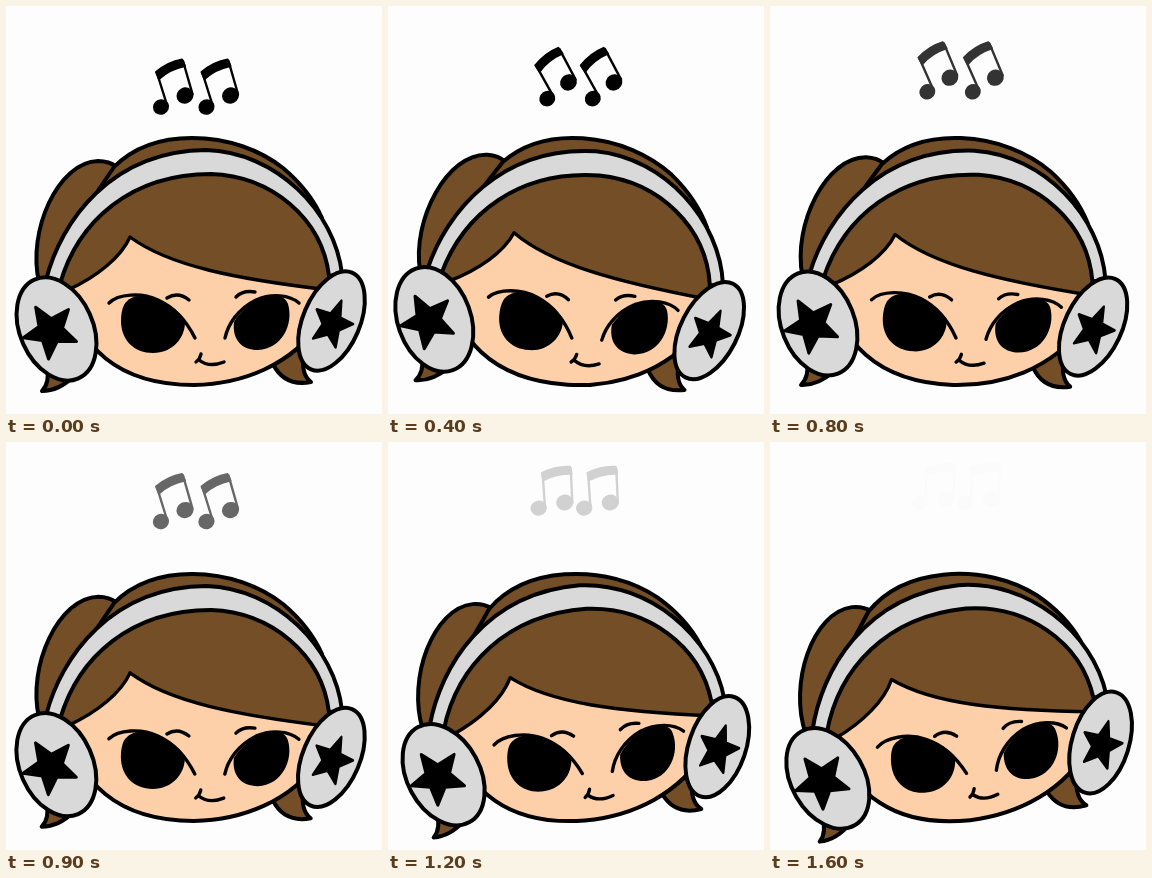
Write an HTML page that moves like this. It is 376 by 408 pixels and loops after 1.7 s.

```html
<!DOCTYPE html>
<html lang="en">
<head>
<meta charset="utf-8">
<title>Headphones girl</title>
<style>
html, body { margin: 0; width: 100%; height: 100%; overflow: hidden; background: #fdfdfd; }
svg { display: block; width: 376px; height: 408px; }
.line { fill: none; stroke: #000; stroke-width: 4; stroke-linecap: round; stroke-linejoin: round; }
.thin { stroke-width: 3.4; }
.hair { fill: #734e26; }
.skin { fill: #fdd0aa; }
.grey { fill: #d9d9d9; }
.star { stroke: #000; stroke-width: 3; stroke-linejoin: round; }
.head { transform-origin: 186px 258px; }
.note { transform-origin: 167px 81px; }
</style>
</head>
<body>
<svg viewBox="0 0 376 408">
  <defs>
    <g id="pair">
      <ellipse cx="155" cy="101" rx="8.2" ry="7.6" transform="rotate(-25 155 101)"/>
      <ellipse cx="179" cy="89.5" rx="8.6" ry="8" transform="rotate(-25 179 89.5)"/>
      <path d="M150 66 Q162 56 176 53.5 L179 60 Q164 63 153 73Z" stroke="#000" stroke-width="2" stroke-linejoin="round"/>
      <path d="M151 67 L161 99 M177 55 L186.5 88" class="line" style="stroke-width:2.4"/>
    </g>
    <path id="star" class="star" d="M0 -28 L7.3 -10 L26.6 -8.7 L11.8 3.8 L16.5 22.7 L0 12.4 L-16.5 22.7 L-11.8 3.8 L-26.6 -8.7 L-7.3 -10Z"/>
  </defs>

  <g class="note"><use href="#pair"/></g>
  <g transform="translate(45.5)"><g class="note"><use href="#pair"/></g></g>

  <g class="head">
    <!-- back hair and tails -->
    <path class="line hair" d="M33 276 C21 225 52 156 92 155 C101 155 107 158 111 161 L120 220 L58 290Z"/>
    <path class="line hair" d="M108 161 C130 139 158 132 186 132 C222 132 254 144 277 162 C296 178 308 194 316 212 L200 220 L75 210Z"/>
    <path class="line hair" d="M41 360 Q44 377 36 385 Q53 385 68 370Z"/>
    <path class="line hair" d="M267 358 C275 374 289 379 305 376 Q294 368 298 345 L285 335Z"/>

    <!-- face and fringe -->
    <path class="line skin" d="M64 284 C70 340 112 379 188 379 C236 378 285 360 316 315 L322 268 L200 190 L124 190Z"/>
    <path class="hair" d="M52 284 C70 216 124 168 205 168 C270 168 328 212 328 284 L323 284 C230 273 163 260 124 231 C115 251 92 270 62 284Z"/>
    <path class="line thin" d="M323 284 C230 273 163 260 124 231 C115 251 92 270 62 284"/>

    <!-- headphone band -->
    <path class="line grey" d="M40 274 C55 215 105 145 200 144 C270 146 329 205 336 268 L323 270 C316 212 265 170 205 168 C125 168 72 215 54 278Z"/>

    <!-- eyes, brows, mouth -->
    <path d="M118 299 C122 292 130 289 140 290 C158 293 172 304 179 314 C180 332 166 347 147 347 C128 347 115 334 115 315 C115 309 116 303 118 299Z"/>
    <path d="M228 316 C235 304 248 294 262 290 C272 288 280 291 282 298 C288 318 276 343 252 344 C236 344 226 334 228 316Z"/>
    <g class="line thin">
      <path d="M103 297 C112 288 135 286 152 294 C172 303 182 318 189 332"/>
      <path d="M219 332 C222 318 232 303 250 294 C266 287 284 289 293 297"/>
      <path d="M161 292 Q172 285 183 294"/>
      <path d="M230 291 Q237 284 249 286"/>
      <path d="M195 348 Q194 353 190 356 M193 354 Q203 362 218 356"/>
    </g>

    <!-- ear cups -->
    <ellipse class="line grey" cx="50.5" cy="323" rx="36.5" ry="54" transform="rotate(-24 50.5 323)"/>
    <ellipse class="line grey" cx="325.5" cy="315" rx="28.5" ry="52.5" transform="rotate(23 325.5 315)"/>
    <use href="#star" transform="translate(44.5 325) rotate(-32)"/>
    <use href="#star" transform="translate(326 318) rotate(22) scale(.74 .9)"/>
  </g>
</svg>
<script>
const LOOP = 1700, TICK = 100, TURN = 630;
const head = document.querySelector('.head');
const notes = document.querySelectorAll('.note');

// The three key poses: head tilt, note tilt, note rise, note opacity
const start = [0, 0, 0, 1];
const left = [4.4, -13, -11.5, 1];
const right = [-5.9, 18.7, -35.6, 0];

const bezier = (a, b, s) => 3 * a * s * (1 - s) ** 2 + 3 * b * s * s * (1 - s) + s ** 3;

// Same curve as the CSS "ease" keyword
function ease(x) {
  let lo = 0, hi = 1;
  for (let i = 0; i < 24; i++) {
    const mid = (lo + hi) / 2;
    if (bezier(.25, .25, mid) < x) lo = mid; else hi = mid;
  }
  return bezier(.1, 1, lo);
}

function pose(t) {
  const [from, to, x] = t < TURN
    ? [start, left, t / TURN]
    : [left, right, (t - TURN) / (LOOP - TURN)];
  const p = ease(x);
  return from.map((v, i) => v + (to[i] - v) * p);
}

function draw() {
  const t = Math.floor(performance.now() % LOOP / TICK) * TICK;
  const [tilt, turn, rise, alpha] = pose(t);
  head.style.transform = `rotate(${tilt}deg)`;
  for (const note of notes) {
    note.style.transform = `translateY(${rise}px) rotate(${turn}deg)`;
    note.style.opacity = alpha;
  }
  requestAnimationFrame(draw);
}
draw();
</script>
</body>
</html>
```
